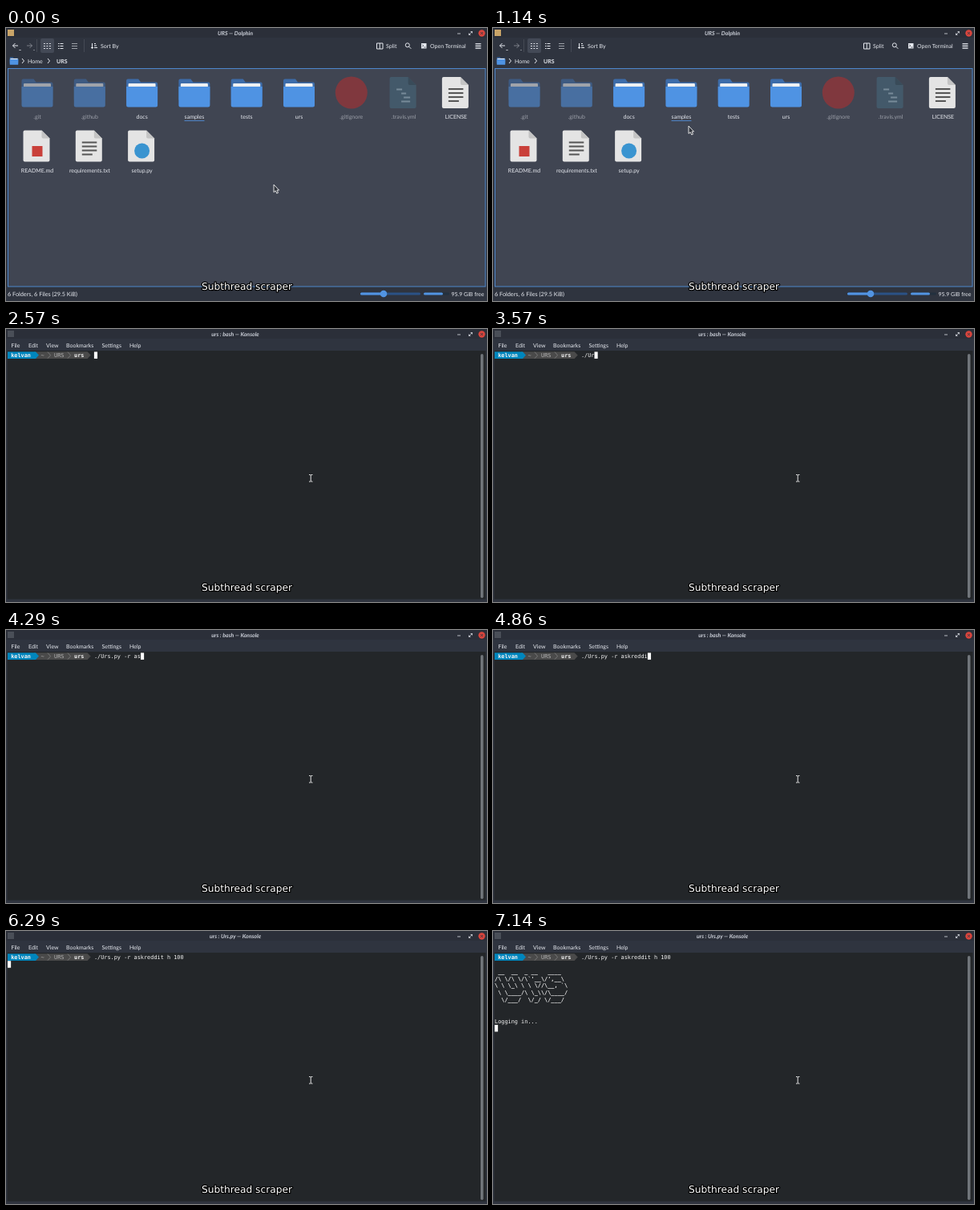
Write an HTML page that moves like this. It is 600 px wide and 340 px high and loops after 8 s.

```html
<!DOCTYPE html>
<html lang="en">
<head>
<meta charset="utf-8">
<title>Scraper demo</title>
<style>
  html, body { margin: 0; width: 100%; height: 100%; overflow: hidden; background: #2f343f; }
  svg { display: block; width: 600px; height: 340px; }
  text { font: 7px Lato, sans-serif; fill: #e6e9ef; white-space: pre; text-rendering: geometricPrecision; }
  .mid { text-anchor: middle; }
  .title { font-weight: bold; font-style: italic; text-anchor: middle; fill: #ccd0d9; }
  .status { font-size: 7.3px; }
  .mono { font: 6.894px "DejaVu Sans Mono", monospace; fill: #f4f4f4; }
  .bold { font-weight: bold; }
  .dim { fill: #b4b4b4; }
  .caption { font: 12.2px "DejaVu Sans", sans-serif; fill: #fff; text-anchor: middle;
    stroke: #000; stroke-width: 2.4px; stroke-linejoin: round; paint-order: stroke; }
  .line { fill: none; stroke: #e6e9ef; stroke-width: 1; }
</style>
</head>
<body>
<svg viewBox="0 0 600 340">
  <defs>
    <g id="folder">
      <path d="M-19.5 -15q0-2 2-2h13l3 4h19q2 0 2 2v20h-39z" fill="#3d6ca9"/>
      <rect x="-17" y="-11.5" width="34" height="8" rx="1" fill="#eef0f2"/>
      <path d="M-19.5 -7.5h39v23q0 2.5-2.5 2.5h-34q-2.5 0-2.5-2.5z" fill="#4f93e3"/>
    </g>
    <path id="sheet" d="M-15.5 -19.5h21l10 10v27q0 2-2 2h-29q-2 0-2-2v-35q0-2 2-2z"/>
    <path id="fold" d="M5.5 -19.5l10 10h-8q-2 0-2-2z"/>
    <g id="page"><use href="#sheet" fill="#e4e4e4"/><use href="#fold" fill="#c4c4c4"/></g>
    <g id="text">
      <use href="#page"/>
      <path d="M-9.5 -4.5h18.5M-9.5 .5h18.5M-9.5 5.5h18.5M-9.5 10.5h13" stroke="#555" stroke-width="2"/>
    </g>
    <g id="markdown"><use href="#page"/><rect x="-6.5" y="0" width="13" height="13" fill="#c9403a"/></g>
    <g id="python"><use href="#page"/><circle cy="6" r="9.5" fill="#3a94d0"/></g>
    <circle id="git" r="20" fill="#b52f2f"/>
    <g id="yaml">
      <use href="#sheet" fill="#476b7f"/><use href="#fold" fill="#34505f"/>
      <path d="M-9 -4h7M-3 1h6M0 6h8M-3 11h11" stroke="#a4c4d3" stroke-width="2"/>
    </g>
    <g id="buttons">
      <path class="line" d="M563 7h4M577.5 8.500l4-4M579.5 4.500h2v2M577.5 6.500v2h2" stroke-width=".8" opacity=".75"/>
      <circle cx="593.5" cy="6.5" r="4.2" fill="#d9453d"/>
      <path d="M592 5l3 3m0-3l-3 3" stroke="#2f343f" stroke-width=".9"/>
    </g>
  </defs>

  <g id="files">
    <rect width="600" height="340" fill="#2f343f"/>
    <rect width="600" height="12" fill="#2b2f39"/>
    <rect x="2" y="2" width="8" height="8" fill="#c9a468"/>
    <text class="title" x="286" y="8.5">URS — Dolphin</text>
    <use href="#buttons"/>

    <path class="line" d="M15 22h-6.5m3-3l-3 3l3 3" stroke-width="1.2"/>
    <path class="line" d="M16.5 27l1 1l1-1"/>
    <path class="line" d="M26 22h6.5m-3-3l3 3l-3 3M34 27l1 1l1-1" opacity=".4"/>
    <path class="line" d="M38.5 14v16M97.5 14v16" opacity=".12"/>
    <rect x="43" y="13" width="17" height="18" rx="2" fill="#434956"/>
    <path class="line" d="M47 19.5h9M47 22.5h9M47 25.5h9" stroke-width="1.8" stroke-dasharray="1.8 1.7"/>
    <path class="line" d="M65 19.5h1.5m1 0h4M65 22.5h1.5m1 0h4M65 25.5h1.5m1 0h4" stroke-width="1.5"/>
    <path class="line" d="M82 19.5h7M82 22.5h7M82 25.5h7" stroke-width="1.4" opacity=".6"/>
    <path class="line" d="M107.5 19v6.5m-1.5-1.5l1.5 1.5l1.5-1.5M110 19.5h2M110 22h3M110 24.5h4"/>
    <text x="118" y="24.5">Sort By</text>
    <path class="line" d="M462.5 19h7.5v7h-7.5zM466.25 19v7"/>
    <text x="474" y="24.5">Split</text>
    <circle class="line" cx="500.8" cy="21.3" r="2.5" stroke-width="1.2"/>
    <path class="line" d="M502.7 23.2l2.6 2.6" stroke-width="1.4"/>
    <rect x="518" y="19" width="6.5" height="6.5" fill="#e6e9ef"/>
    <path d="M519.2 20.5l1.5 1.5l-1.5 1.5M521.5 24h2" fill="none" stroke="#2f343f" stroke-width=".8"/>
    <text x="529" y="24.5">Open Terminal</text>
    <path class="line" d="M585.5 19.5h7M585.5 21.5h7M585.5 23.5h7M585.5 25.5h7"/>

    <use href="#folder" transform="translate(10 41) scale(.27)"/>
    <path class="line" d="M20 38l2.5 3l-2.5 3M52 38l2.5 3l-2.5 3" stroke-width=".9"/>
    <text x="27" y="43.5">Home</text>
    <text class="bold" x="63" y="43.5">URS</text>

    <rect x="2.5" y="50.5" width="595.5" height="271.5" fill="#404552" stroke="#4d87cc"/>
    <g id="icons"></g>
    <path d="M222.500 115.5h25" stroke="#5294e2" stroke-width=".8"/>

    <text class="status" x="2" y="333.5">6 Folders, 6 Files (29.5 KiB)</text>
    <rect x="442" y="329.5" width="75" height="3" rx="1.5" fill="#2b5286"/>
    <rect x="442" y="329.5" width="29" height="3" rx="1.5" fill="#5294e2"/>
    <circle cx="471" cy="331" r="4.3" fill="#5294e2"/>
    <rect x="521" y="329.5" width="32" height="3" rx="1.5" fill="#23303f"/>
    <rect x="521" y="329.5" width="24" height="3" rx="1.5" fill="#5294e2"/>
    <text x="555.5" y="333.5">95.9 GiB free</text>
    <path id="pointer" d="M0 0v9.5l2.2-1.8l1.6 3.3l1.7-.8l-1.5-3.2h2.6z" fill="#30343c" stroke="#f2f2f2" stroke-width=".9"/>
  </g>

  <g id="terminal">
    <rect width="600" height="340" fill="#2f343f"/>
    <rect width="600" height="12" fill="#2b2f39"/>
    <rect x="1.5" y="27" width="597" height="309.5" fill="#232629"/>
    <rect x="592" y="31" width="3.5" height="304" rx="1.75" fill="#70757a"/>
    <rect x="2" y="2" width="8" height="8" fill="#4a4f58"/>
    <text class="title" id="title" x="286" y="8.5"></text>
    <use href="#buttons"/>
    <g id="menu"></g>

    <path d="M35 28.3h66.6l4.15 4.3l-4.15 4.4h-66.6z" fill="#4a4a4a"/>
    <path d="M2 28.3h35l4 4.3l-4 4.4h-35z" fill="#0086bd"/>
    <path d="M52 28.6l3.6 4l-3.6 4M77 28.6l3.6 4l-3.6 4" fill="none" stroke="#8c8c8c" stroke-width=".7"/>
    <text class="mono bold" x="6.15" y="35">kelvan</text>
    <text class="mono dim" x="43.5" y="35">~</text>
    <text class="mono dim" x="60.1" y="35">URS</text>
    <text class="mono bold" x="85" y="35">urs</text>
    <text class="mono" id="command" x="109.9" y="35"></text>
    <g id="output"></g>
    <rect id="caret" width="4.15" height="8.5" fill="#fff"/>
    <path d="M378 181.5h1.5l.7.6l.7-.6h1.5M380.2 182v7.5M378 190h1.5l.7-.6l.7.6h1.5" fill="none" stroke="#e8e8e8"/>
  </g>

  <text class="caption" x="300.5" y="325.5">Subthread scraper</text>
</svg>
<script>
const $ = id => document.getElementById(id);
const CELL = 4.15, ROW = 8.85, STEP = 1000 / 7, LOOP = 8000;
const COMMAND = './Urs.py -r askreddit h 100';
const BANNER = [
  " __  __  _ __   ____",
  "/\\ \\/\\ \\/\\`'__\\/',__\\",
  "\\ \\ \\_\\ \\ \\ \\//\\__, `\\",
  " \\ \\____/\\ \\_\\\\/\\____/",
  "  \\/___/  \\/_/ \\/___/"
];

// name, icon, faded
const FILES = [
  ['.git', 'folder', 1], ['.github', 'folder', 1], ['docs', 'folder'], ['samples', 'folder'],
  ['tests', 'folder'], ['urs', 'folder'], ['.gitignore', 'git', 1], ['.travis.yml', 'yaml', 1],
  ['LICENSE', 'text'], ['README.md', 'markdown'], ['requirements.txt', 'text'], ['setup.py', 'python']
];
$('icons').innerHTML = FILES.map(([name, icon, faded], i) => {
  const x = 39 + i % 9 * 65.3, y = 80.5 + Math.floor(i / 9) * 66.5;
  return `<g transform="translate(${x} ${y})" opacity="${faded ? .55 : 1}">
    <use href="#${icon}"/><text class="mid" y="32.5">${name}</text></g>`;
}).join('');

$('menu').innerHTML = [[6.5, 'File'], [28, 'Edit'], [50, 'View'], [75, 'Bookmarks'], [119.5, 'Settings'], [154, 'Help']]
  .map(([x, label]) => `<text x="${x}" y="22.5">${label}</text>`).join('');

const textLine = (row, string, style = '') =>
  `<text class="mono ${style}" x="2" y="${35 + row * ROW}">${string}</text>`;
$('output').innerHTML = BANNER.map((string, i) => textLine(i + 2, string, 'bold')).join('')
  + textLine(9, 'Logging in...');

// step, x, y
const POINTER = [[0, 334, 195], [8, 244, 122], [10, 297, 123], [12, 297, 123], [15, 380, 186], [99, 380, 186]];
// step, characters typed
const TYPED = [[0, 0], [23, 2], [25, 4], [26, 9], [28, 10], [29, 12], [30, 14], [31, 16], [32, 17],
  [33, 19], [34, 20], [35, 22], [36, 24], [37, 25], [38, 26], [39, 27]];
const OPEN = 18, ENTER = 41, RUN = 44, PRINT = 45;

function pointerAt(step) {
  const i = POINTER.findIndex(key => key[0] > step);
  const [s0, x0, y0] = POINTER[i - 1], [s1, x1, y1] = POINTER[i];
  const u = (step - s0) / (s1 - s0), e = u * u * (3 - 2 * u);
  return [x0 + (x1 - x0) * e, y0 + (y1 - y0) * e];
}

function draw(now) {
  const step = Math.floor((now % LOOP + 4) / STEP);
  const inTerminal = step >= OPEN;
  $('files').style.display = inTerminal ? 'none' : '';
  $('terminal').style.display = inTerminal ? '' : 'none';
  $('pointer').setAttribute('transform', `translate(${pointerAt(step)})`);

  const count = TYPED.filter(key => key[0] <= step).pop()[1];
  const row = step >= PRINT ? 10 : step >= ENTER ? 1 : 0;
  $('command').textContent = COMMAND.slice(0, count);
  $('title').textContent = `urs : ${step >= RUN ? 'Urs.py' : 'bash'} — Konsole`;
  $('output').style.display = step >= PRINT ? '' : 'none';
  $('caret').setAttribute('x', row ? 2 : 109.9 + count * CELL);
  $('caret').setAttribute('y', 28.4 + row * ROW);
  requestAnimationFrame(() => draw(performance.now()));
}
draw(performance.now());
</script>
</body>
</html>
```
